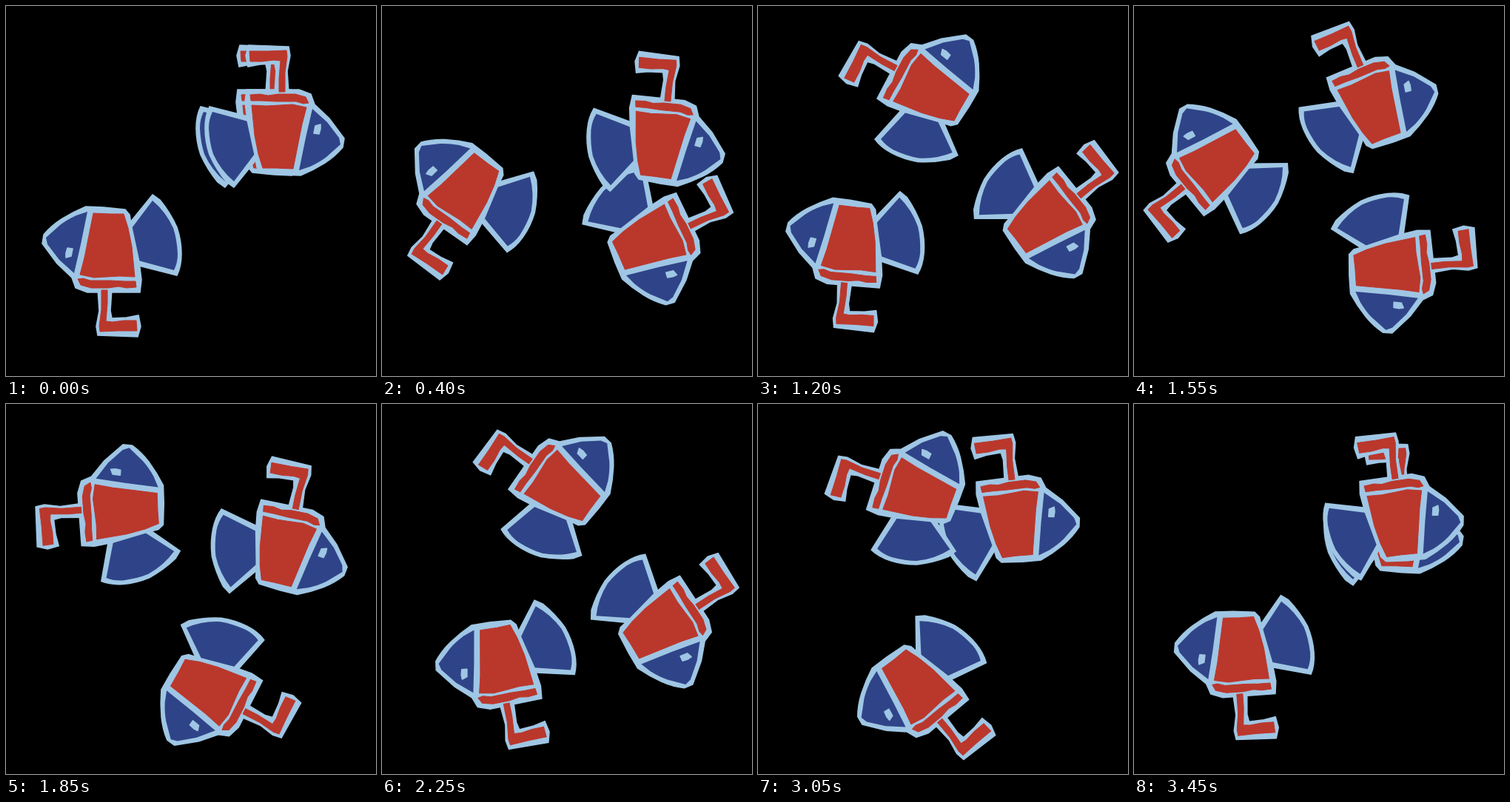
An HTML page that plays this animation: 500x500 px, repeating every 3.5 s.

```html
<!DOCTYPE html>
<html>
<head>
<meta charset="utf-8">
<title>Circling cup fish</title>
<style>
  html, body { margin: 0; width: 100%; height: 100%; overflow: hidden; background: #000; }
  svg { display: block; width: 500px; height: 500px; }
  .line { fill: #9fc6e4; stroke: #9fc6e4; stroke-width: 1.6; }
  .red { fill: #ba372c; stroke: #ba372c; stroke-width: 1; stroke-linejoin: round; }
  .blue { fill: #2f4488; }
</style>
</head>
<body>
<svg viewBox="0 0 500 500">
  <defs>
    <g id="fish" transform="translate(-256 -250)">
      <!-- tail -->
      <path class="line" d="M308 245 298 238Q284 221 275 201 269 183 269 165 269 148 275 136L330 150 342 203Z"/>
      <path class="blue" d="M308 237 336 200 327 156 279 143Q274 153 274 165 275 185 280 200 290 222 308 237Z"/>
      <!-- straw, cup and head outline -->
      <path class="line" d="M382 118 380 88 384 67 382 55 328 53 324 67 327 82 343 79 363 78 365 88 363 118Z"/>
      <path class="line" d="M325 113 396 113 412 119 417 133 437 152 457 179 455 191Q445 203 431 212 415 222 398 229L374 228 345 225 339 218 336 200 326 154 323 130Z"/>
      <path class="red" d="M377 116 369 116 369 98 371 74 362 73 346 75 330 75 329 61 355 61 379 60 380 68 377 90Z"/>
      <path class="red" d="M409 131 402 132 392 129 365 129 345 128 331 128 330 120 343 119 354 121 368 119 391 119 405 123Z"/>
      <path class="red" d="M388 220 365 219 347 219 341 200 336 175 332 134 352 135 370 134 387 133 406 137 400 160Z"/>
      <path class="blue" d="M396 222 411 217Q424 211 433 204L452 187 450 178 434 157 414 139 405 178Z"/>
      <path class="line" stroke-linejoin="round" d="M423 173 416 172 418 162 425 160 425 166Z"/>
    </g>
  </defs>
  <use href="#fish"/>
  <use href="#fish"/>
  <use href="#fish"/>
</svg>
<script>
  const LOOP = 3500, STEP = 50;
  const slowing = u => Math.sin(u * Math.PI / 2);
  const speeding = u => 1 - Math.cos(u * Math.PI / 2);
  const steady = u => (slowing(u) + speeding(u)) / 2;

  // Each fish makes one turn per loop around its own centre.
  const swims = [
    { centre: 244, start: 0, ease: slowing },
    { centre: 250, start: 180, ease: steady },
    { centre: 256, start: 0, ease: speeding }
  ];
  const fish = document.querySelectorAll('use');
  const begin = performance.now();

  function draw(now) {
    const time = Math.max(0, now - begin) % LOOP;
    const u = Math.floor(time / STEP) * STEP / LOOP;
    swims.forEach(({ centre, start, ease }, i) => {
      const angle = start + 360 * ease(u);
      fish[i].setAttribute('transform', `translate(${centre} 250) rotate(${angle})`);
    });
    requestAnimationFrame(draw);
  }
  draw(begin);
</script>
</body>
</html>
```
